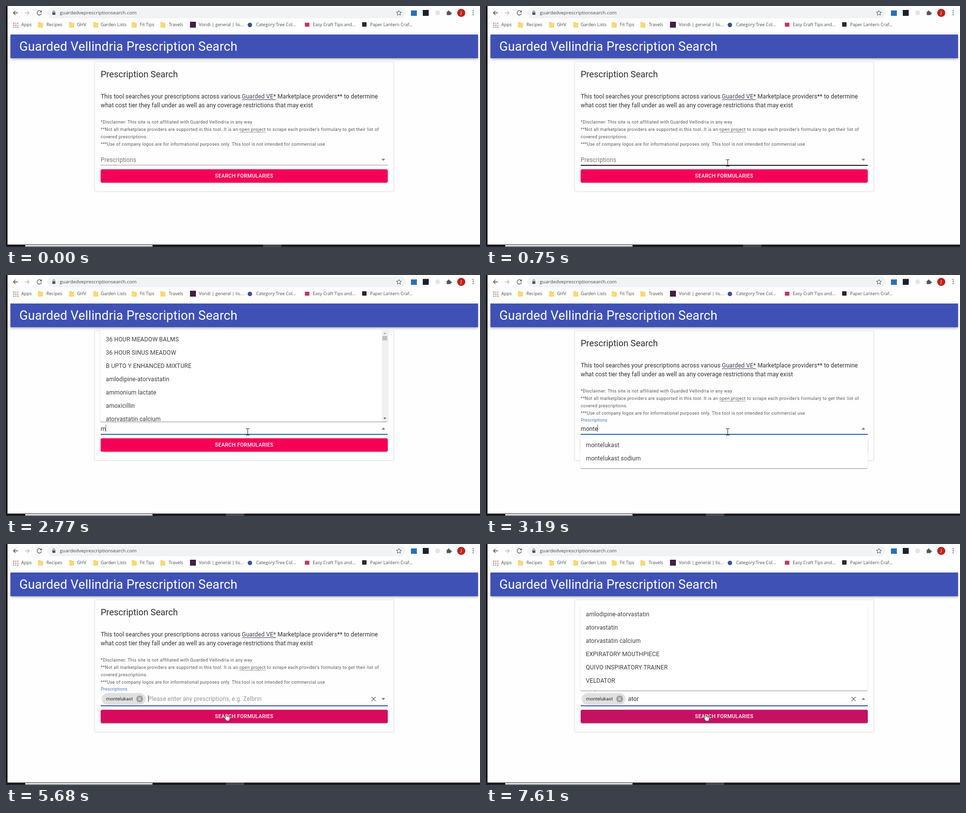
An HTML page for the animation above (8000 ms loop, 961 by 490 pixels).

```html
<!DOCTYPE html>
<html lang="en">
<head>
<meta charset="utf-8">
<title>Prescription Search</title>
<style>
html, body { margin: 0; width: 100%; height: 100%; overflow: hidden; background: #fff; }
#stage { position: absolute; left: 0; top: 0; width: 961px; height: 490px; overflow: hidden; background: #fefefe;
  font: 12px Roboto, sans-serif; letter-spacing: .00938em; color: rgba(0,0,0,.82); }
#stage div, #stage svg { position: absolute; }
#stage svg { overflow: visible; left: 0; top: 0; width: 1px; height: 1px; }
.text { white-space: pre; line-height: 20px; margin-top: -10px; }
.chrome { font: 9.8px/20px 'Open Sans', sans-serif; letter-spacing: 0; color: #4a4d51; }
.mark { font-size: 9px; }
.title { font-size: 25.5px; line-height: 32px; margin-top: -16px; letter-spacing: .00735em; color: #fff; }
.heading { font-size: 18px; letter-spacing: 0; }
.small { font-size: 9px; letter-spacing: .03333em; color: rgba(0,0,0,.66); }
.link { text-decoration: underline 1px; text-underline-offset: 2px; color: #3a3a58; }
.small .link { color: inherit; text-decoration-color: rgba(0,0,0,.4); }
.hint { color: rgba(0,0,0,.42); }
.label { color: rgba(0,0,0,.54); line-height: 12px; margin-top: -6px; transform-origin: 0 0; }
.bar { left: 9px; top: 58px; width: 948px; height: 48px; background: #3f51b5;
  box-shadow: 0 1.5px 3px -.75px rgba(0,0,0,.2), 0 3px 4px rgba(0,0,0,.14), 0 1px 7px rgba(0,0,0,.12); }
.card { left: 179px; top: 113px; width: 606px; height: 263px; border: 1px solid #dcdcdc; border-radius: 3px; }
.button { left: 192px; top: 332px; width: 582px; height: 27px; border-radius: 3px; background: #f50057; color: #fff;
  text-align: center; font-weight: 500; font-size: 10.5px; line-height: 27px; letter-spacing: .02857em;
  box-shadow: 0 2px 1.5px -1.5px rgba(0,0,0,.2), 0 1.5px 1.5px rgba(0,0,0,.14), 0 .75px 4px rgba(0,0,0,.12); }
.popup { left: 191px; width: 583px; background: #fff; border-radius: 3px; overflow: hidden;
  box-shadow: 0 1.5px 1px -1px rgba(0,0,0,.3), 0 1px 1px rgba(0,0,0,.2), 0 1px 3px rgba(0,0,0,.14); }
.item { left: 0; width: 100%; height: 27px; line-height: 27px; text-indent: 11.5px; white-space: pre; color: rgba(0,0,0,.76); }
.scroll { right: 0; top: 0; width: 12px; height: 100%; background: #f1f1f1; }
.chip { left: 194px; top: 303px; width: 89px; height: 24px; border-radius: 12px; background: #e0e0e0; }
.chip .text { font-size: 9.75px; letter-spacing: 0; }
.caret { left: 0; top: 304px; width: 1px; height: 15px; background: #777; }
</style>
</head>
<body>
<div id="stage"></div>
<script>
const LOOP = 8000;
const OPEN = 1600, PICK = 5530, REOPEN = 7050;
const stage = document.getElementById('stage');
const start = document.timeline.currentTime ?? 0;

function add(cls, html = '', style = {}, parent = stage) {
  const el = document.createElement('div');
  el.className = cls;
  el.innerHTML = html;
  Object.assign(el.style, style);
  parent.append(el);
  return el;
}
const text = (x, y, str, cls = '', parent) => add('text ' + cls, str, { left: x + 'px', top: y + 'px' }, parent);
const box = (x, y, w, h, background, radius = 0, parent) =>
  add('', '', { left: x + 'px', top: y + 'px', width: w + 'px', height: h + 'px', background, borderRadius: radius + 'px' }, parent);
const draw = (shapes, parent) => add('', `<svg>${shapes}</svg>`, { left: 0, top: 0 }, parent);

// steps: [ms, css] pairs; hold keeps each value until the next one
function play(el, steps, hold = false) {
  const easing = hold ? 'steps(1)' : 'linear';
  const frames = steps.map(([ms, css]) => ({ ...css, offset: ms / LOOP, easing }));
  frames.push({ ...steps.at(-1)[1], offset: 1 });
  el.animate(frames, { duration: LOOP, iterations: Infinity }).startTime = start;
}
function show(el, ...spans) {
  const steps = [[0, { opacity: 0 }]];
  for (const [from, to] of spans) {
    steps.push([from, { opacity: 1 }]);
    if (to < LOOP) steps.push([to, { opacity: 0 }]);
  }
  play(el, steps, true);
}

// Browser frame
box(84, 3, 726, 22, '#f1f3f4', 11);
text(109, 14, 'guardedveprescriptionsearch.com', 'chrome');
draw(`<g fill="none" stroke="#50545a" stroke-width="1.3">
  <path d="M24 14H15m4.2-4.3L15 14l4.2 4.3"/>
  <path d="M38 14h9m-4.2-4.3L47 14l-4.2 4.3" stroke="#bcbec1"/>
  <path d="M71 11a4.5 4.5 0 1 0 1 4"/>
  <path d="M95.2 13v-1.6a1.8 1.8 0 0 1 3.6 0V13" stroke-width="1"/>
  <path d="M796.5 9l1.5 3.3 3.6.4-2.7 2.4.8 3.6-3.2-1.9-3.2 1.9.8-3.6-2.7-2.4 3.6-.4z" stroke-width="1"/></g>
  <g fill="#50545a"><path d="M72.5 8.6v4.2h-4.2zM94 13h6v5h-6z"/>
  <path d="M893.5 11.5h8v7h-8z"/><circle cx="897.5" cy="11" r="1.8"/><circle cx="902" cy="15" r="1.8"/>
  ${[9.7, 13.7, 17.7].map(y => `<circle cx="947" cy="${y}" r="1.1"/>`).join('')}</g>
  <circle cx="875" cy="14" r="5" fill="#e3e4e6"/><circle cx="923" cy="14" r="8.2" fill="#bb2418"/>`);
box(820.5, 8.5, 12, 11, '#2a6fc0');
box(844.5, 8, 12, 12, '#17222f');
text(921.5, 13.5, 'J', 'chrome').style.color = '#fff';

['#d93a2b', '#e8711a', '#4285d0', '#3a9a55'].forEach((color, k) => {
  for (let n = k; n < 9; n += 4) box(14.5 + n % 3 * 4, 33.5 + Math.floor(n / 3) * 4, 2.4, 2.4, color);
});
for (const x of [65, 128, 177, 255, 313]) {
  box(x, 33, 5, 4, '#f2c64d', 1);
  box(x, 34, 10, 9.5, '#fbd872', 1);
}
box(373, 32, 12, 12, '#43203f');
box(490, 33.5, 9, 9, '#33539a', 5);
box(606, 34, 9, 8, '#cc3358');
box(722, 33, 9, 9, '#2a2a2a');
[[31, 'Apps'], [82, 'Recipes'], [144, 'GHV'], [192, 'Garden Lists'], [271, 'Fit Tips'], [330, 'Travels'],
 [391, 'Vondi | general | lis...'], [507, 'Category:Tree Col...'], [622, 'Easy Craft Tips and...'],
 [738, 'Paper Lantern Craf...']].forEach(([x, name]) => text(x, 38, name, 'chrome mark'));

// Page
add('bar');
text(27, 82, 'Guarded Vellindria Prescription Search', 'title');
const card = add('card');
text(192, 138.5, 'Prescription Search', 'heading');
text(192, 183.5, 'This tool searches your prescriptions across various <span class="link">Guarded VE*</span> Marketplace providers** to determine');
text(192, 201.5, 'what cost tier they fall under as well as any coverage restrictions that may exist');
['*Disclaimer: This site is not affiliated with Guarded Vellindria in any way',
 '**Not all marketplace providers are supported in this tool. It is an <span class="link">open project</span> to scrape each provider\'s formulary to get their list of',
 'covered prescriptions.',
 '***Use of company logos are for informational purposes only. This tool is not intended for commercial use'
].forEach((line, i) => text(192, 236 + 15 * i, line, 'small'));
play(card, [[0, { height: '263px' }], [PICK, { height: '268px' }]], true);

// Field and button; the lower part drops once a chip is in the field
const lower = add('');
play(lower, [[0, { transform: 'none' }], [PICK, { transform: 'translateY(5px)' }]], true);
box(192, 323, 582, 1, '#949494', 0, lower);
const hoverLine = box(192, 322.5, 582, 2, '#222', 0, lower);
play(hoverLine, [[0, { opacity: 0 }], [360, { opacity: 0 }], [560, { opacity: 1 }]]);
const focusLine = box(192, 322.5, 582, 2, '#1a66b0', 0, lower);
play(focusLine, [[0, { transform: 'scaleX(0)' }], [OPEN, { transform: 'scaleX(0)' }], [1800, { transform: 'scaleX(1)' }]]);
play(focusLine, [[0, { background: '#2a67a8' }], [PICK, { background: '#3f51b5' }]], true);
for (const line of [hoverLine, focusLine]) line.style.top = '323px';

const button = add('button', 'SEARCH FORMULARIES', {}, lower);
const pink = { backgroundColor: '#f50057' }, plum = { backgroundColor: '#c51162' };
play(button, [[0, pink], [80, pink], [290, plum], [330, plum], [580, pink], [PICK, pink], [5780, plum]]);

const label = text(192, 312.5, 'Prescriptions', 'label');
const rest = { transform: 'none', color: 'rgba(0,0,0,.54)' };
play(label, [[0, rest], [OPEN, rest], [1800, { transform: 'translateY(-16.5px) scale(.75)', color: '#4a7ab0' }]]);

const arrow = draw('<path d="M-3.75-1.9H3.75L0 1.9z" fill="#757575"/>');
const pose = (y, turn) => ({ transform: `translate(765px, ${y}px) rotate(${turn}deg)` });
play(arrow, [[0, pose(312.7, 0)], [OPEN, pose(312.3, 180)], [PICK, pose(315.2, 0)], [REOPEN, pose(314.8, 180)]], true);

const HINT = 'Please enter any prescriptions, e.g. Zelbrin';
const firstHint = text(192, 312.5, HINT, 'hint');
play(firstHint, [[0, { opacity: 0 }], [1630, { opacity: 0 }], [1830, { opacity: 1 }], [2769, { opacity: 1 }], [2770, { opacity: 0 }]]);
show(text(288, 315, HINT, 'hint'), [PICK, REOPEN]);

const chip = add('chip');
text(9, 12, 'montelukast', '', chip);
draw('<circle cx="77" cy="12" r="6.9" fill="#a2a2a2"/><path d="M74.3 9.3l5.4 5.4m0-5.4l-5.4 5.4" stroke="#e0e0e0" stroke-width="1.4"/>', chip);
show(chip, [PICK, LOOP]);
show(draw('<path d="M741 311l8.4 8.4m0-8.4l-8.4 8.4" stroke="#6a6a6a" stroke-width="1.3"/>'), [PICK, LOOP]);

// Typing and the suggestion lists
const catalogue = [
  '1ST PEAK ORFINE FALTIPS', '1ST PEAK ORFINE FALTIPSPLUS', '1ST PEAK ORFILETSOFTERHAND',
  '36 HOUR MEADOW BALMS', '36 HOUR SINUS MEADOW', '3VOX BALANCE (LOW-REGULAR) 52B UPTO Y',
  'B UPTO Y ENHANCED MIXTURE', 'amlodipine-atorvastatin', 'ammonium lactate', 'amoxicillin',
  'atorvastatin', 'atorvastatin calcium', 'cefaclor monohydrate', 'EXPIRATORY MOUTHPIECE',
  'isosorbide mononitrate', 'LEMON GLYCERIN SWABS', 'montelukast', 'montelukast sodium',
  'QUIVO INSPIRATORY TRAINER', 'VELDATOR'];
const ROW = 27, PAD = 6, MAX_HEIGHT = 186, POPUP_BOTTOM = 298;

function popup(query, from, to, below = false) {
  const names = catalogue.filter(name => name.toLowerCase().includes(query));
  const full = names.length * ROW + 2 * PAD;
  const height = Math.min(full, MAX_HEIGHT);
  const top = below ? 327 : POPUP_BOTTOM - height;
  const el = add('popup', '', { top: top + 'px', height: height + 'px' });
  const rows = names.map((name, i) => add('item', name, { top: PAD + ROW * i + 'px' }, el));
  if (full > height) {
    const bar = add('scroll', '', {}, el);
    box(1, 12, 10, 9, '#c1c1c1', 0, bar);
    draw('<path d="M3 8h6L6 5z" fill="#a3a3a3"/><path d="M3 178h6l-3 3z" fill="#505050"/>', bar);
  }
  show(el, [from, to]);
  return rows;
}
popup('', OPEN, 2770);
[['m', 2770, 2880], ['mo', 2880, 2980], ['mon', 2980, 3190], ['monte', 3190, PICK]].forEach(([typed, from, to]) => {
  show(text(192, 312.5, typed), [from, to]);
  const rows = popup(typed, from, to, typed === 'monte');
  if (typed === 'monte') {
    play(rows[0], [[0, { background: '#fff' }], [4990, { background: '#f4f4f4' }]], true);
  }
});
show(text(288, 315, 'ator'), [REOPEN, LOOP]);
popup('ator', REOPEN, LOOP);

const caret = add('caret');
const at = (x, y = 0) => ({ transform: `translate(${x}px, ${y}px)` });
play(caret, [[0, at(192)], [2770, at(202)], [2880, at(209)], [2980, at(216)], [3190, at(226)],
  [PICK, at(288, 3)], [REOPEN, at(309, 3)]], true);
show(caret, [OPEN, 2160], [2770, 3680], [4210, 4750], [5280, 6210], [REOPEN, 7610]);

// Window edge and task bar
box(0, 0, 3, 490, '#000');
box(0, 485, 961, 5, '#231d20');
box(39, 486, 258, 3, '#f3f3f3');
const oldTask = box(521, 485, 37, 5, '#4d484b');
const newTask = box(446, 485, 37, 5, '#4d484b');
play(oldTask, [[0, { opacity: 1 }], [1000, { opacity: 1 }], [1160, { opacity: 0 }]]);
play(newTask, [[0, { opacity: 0 }], [1000, { opacity: 0 }], [1160, { opacity: 1 }]]);

// Pointer, placed by its hot spot
const pointer = add('');
play(pointer, [[0, 648, 375], [50, 648, 375], [150, 588, 353], [250, 530, 336], [340, 501, 325], [500, 494, 321],
  [750, 490, 319], [4010, 490, 319], [4200, 484, 325], [4480, 470, 331], [4990, 470, 331], [5140, 452, 340],
  [5340, 447, 344], [PICK, 447, 344], [5930, 445, 345]].map(([ms, x, y]) => [ms, at(x, y)]));
const shape = (d, fill, stroke) => draw(`<path d="${d}" fill="${fill}" stroke="${stroke}" stroke-width=".9" stroke-linejoin="round"/>`, pointer);
show(shape('M0 0V11.2L2.6 8.8 4.4 12.8 6.2 12 4.5 8.1H8z', '#fff', '#444'), [0, 120], [4170, 4990]);
show(shape('M-3.5-6.5h2.7l.8.7.8-.7h2.7M0-6V6M-3.5 6.5h2.7l.8-.7.8.7h2.7', 'none', '#000'), [300, 4170]);
show(shape('M-1.2 9V1.2a1.2 1.2 0 0 1 2.4 0V6l5 1.2q1.6.4 1.5 2l-.6 3.5-.8 2.3H.8L-2.6 10.4q-.6-1.6 1.4-1.4z', '#fff', '#333'),
  [120, 300], [4990, LOOP]);
</script>
</body>
</html>
```
